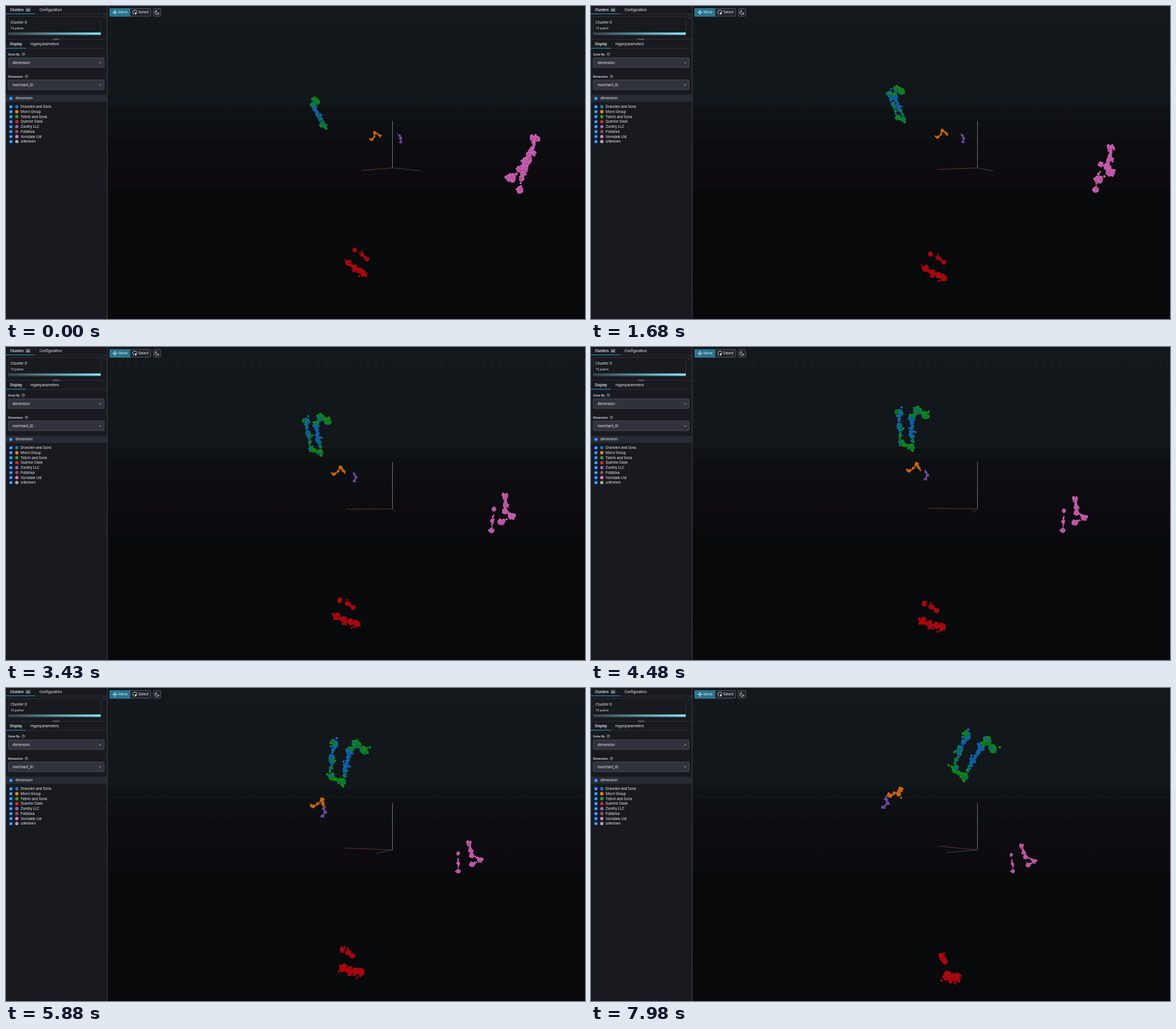
These frames come from a looping animation (1018 px wide and 550 px high, 8000 ms). An HTML page with a canvas:

```html
<!DOCTYPE html>
<html lang="en">
<head>
<meta charset="utf-8">
<title>Cluster view</title>
<style>
  html, body { margin: 0; width: 1018px; height: 550px; overflow: hidden; background: #07090b; }
  canvas, svg { position: absolute; left: 0; top: 0; display: block; }
  text { font: 6.5px Roboto, Arial, sans-serif; fill: #e4e6ea; }
  .bold { font-weight: 500; }
</style>
</head>
<body>
<canvas id="scene" width="1018" height="550"></canvas>
<svg width="1018" height="550" fill="none">
  <defs>
    <linearGradient id="bar"><stop stop-color="#38464c"/><stop offset="1" stop-color="#86ecff"/></linearGradient>
    <g id="help" stroke="#cfd2d8" stroke-width=".6">
      <circle r="2.4"/><path d="M-.8-.5a.8.8 0 1 1 1.1.8q-.3.2-.3.5M0 1.2v.3"/>
    </g>
    <path id="chevron" d="M-1.8-.9 0 .9 1.8-.9" stroke="#dfe2e6" stroke-width=".8"/>
    <g id="check">
      <rect x="-2.8" y="-2.8" width="5.6" height="5.6" rx="1" fill="#1679e6"/>
      <path d="M-1.6 0-.4 1.3 1.7-1.3" stroke="#fff" stroke-width=".9"/>
    </g>
  </defs>
  <path d="M0 0h177v550H0z" fill="#181a1f"/>
  <path d="M177 0h2v550h-2z" fill="#2b2e34"/>

  <text class="bold" x="7" y="9">Clusters</text>
  <rect x="34" y="2.8" width="9.6" height="7.8" rx="2" fill="#3a3e47"/>
  <text class="bold" x="35.8" y="8.8" style="font-size:5.2px">62</text>
  <text x="59" y="9">Configuration</text>
  <path d="M0 14h177M0 58.5h177M0 74.5h177" stroke="#2b2e35"/>
  <path d="M0 13.7h51M0 74.2h35" stroke="#2c9cc6"/>
  <rect x="4" y="18.5" width="162.5" height="33" rx="1" stroke="#30333b"/>
  <text x="8" y="30.7" style="font-size:7.3px">Cluster 0</text>
  <text x="8" y="41.2" style="font-size:5.5px">73 points</text>
  <path d="M4 46.5h162.5v4H4z" fill="url(#bar)"/>
  <rect x="170.5" y="15" width="5.5" height="6.5" rx="2.5" stroke="#3b3e46" stroke-width=".8"/>
  <rect x="82" y="57" width="12" height="3" rx="1" fill="#4a4d55"/>
  <text class="bold" x="7" y="69.3">Display</text>
  <text x="43" y="69.3">Hyperparameters</text>

  <text class="bold" x="3.5" y="86.8" style="font-size:5.5px">Color By</text>
  <use href="#help" x="30.5" y="84.7"/>
  <text class="bold" x="3.5" y="125.8" style="font-size:5.5px">Dimension</text>
  <use href="#help" x="36" y="123.8"/>
  <g fill="#30333c" stroke="#505560" stroke-width=".8">
    <rect x="3.9" y="91" width="168.7" height="17" rx="1.5"/>
    <rect x="3.9" y="130" width="168.7" height="17" rx="1.5"/>
  </g>
  <text x="11.5" y="101.9">dimension</text>
  <text x="11.5" y="140.8">merchant_ID</text>
  <use href="#chevron" x="165.5" y="99.7"/>
  <use href="#chevron" x="165.5" y="138.7"/>

  <path d="M0 156h177v12.5H0z" fill="#272b33"/>
  <use href="#check" x="8.6" y="162.4"/>
  <text x="16.5" y="164.4">dimension</text>
  <g id="legend"></g>

  <rect x="182.5" y="4.5" width="72" height="13.5" rx="1.5" fill="#202329" stroke="#555962"/>
  <path d="M182.5 4.5h35.5v13.5h-35.5z" fill="#26728f" stroke="#3b89a5" stroke-width=".7"/>
  <rect x="259" y="4.5" width="13" height="13.5" rx="1.5" fill="#202329" stroke="#555962"/>
  <g stroke="#fff" stroke-width=".8">
    <path d="M188 11.2h7M191.5 7.7v7M189 10l-1.3 1.2 1.3 1.2M194 10l1.3 1.2-1.3 1.2M190.3 8.7l1.2-1.3 1.2 1.3M190.3 13.7l1.2 1.3 1.2-1.3"/>
    <path d="M224.5 12.3c-4-1.5-1-5 2.5-5s5 3.5 1 4.5M223.5 12.5q1.5.8.5 2.8"/>
    <path d="M264.4 7.7a3.7 3.7 0 1 0 4.6 5a4 4 0 0 1-4.6-5z"/>
  </g>
  <path d="M226.5 10.5l4 3.3-2 .2-1 1.8z" fill="#fff"/>
  <text x="197.7" y="13.4">Move</text>
  <text x="232.8" y="13.4">Select</text>
</svg>
<script>
const legend = [
  ['Dravolen and Sons', '#1f77b4'], ['Morvi Group', '#ff7f0e'], ['Tebrin and Sons', '#2ca02c'],
  ['Quenlor Dask', '#d62728'], ['Zundry LLC', '#9467bd'], ['Fobblixa', '#8c564b'],
  ['Vorndale Ltd', '#e377c2'], ['unknown', '#a8a8a8']
];
document.getElementById('legend').innerHTML = legend.map(([name, color], i) => {
  const y = 177 + i * 8.74;
  return `<use href="#check" x="8.6" y="${y}"/><circle cx="19" cy="${y}" r="2.9" fill="${color}"/>
    <text x="25.8" y="${y + 2.2}">${name}</text>`;
}).join('');

const CX = 679.5, CY = 284.5, UNIT = 84, DIST = 4.7, TILT = 0.09;
const LOOP = 8000, STEP = 70, QUARTER = 7980;

const BLUE = ['#0d5796', '#1669ab'], GREEN = ['#0d7413', '#168f1b'], ORANGE = ['#b85a0a', '#dc7318'],
  RED = ['#9d060d', '#b40c13'], PURPLE = ['#623d90', '#7c52ab'], PINK = ['#ad4b96', '#d069b6'];

let seed = 7;
const random = () => (seed = seed * 16807 % 2147483647) / 2147483647;
const mix = (a, b, t) => a + (b - a) * t;

// Space position from the screen x at the start and the screen x, y a quarter turn later
function locate([x0, x1, y1]) {
  const a = (x0 - CX) / UNIT, b = (x1 - CX) / UNIT, c = (CY - y1) / UNIT;
  let k0 = 1, k1 = 1, x, y, z;
  for (let i = 0; i < 30; i++) {
    x = a * k0;
    z = -b * k1;
    y = c * k1 + TILT * x;
    k0 = 1 + (z + TILT * y) / DIST;
    k1 = 1 + (x + TILT * y) / DIST;
  }
  return { x, y, z };
}

// Scatters dots along a strand: dense and wide at its key points, thin between them
function strand(pick, spread, perPoint, keys) {
  const points = keys.map(locate), last = points.length - 1;
  return Array.from({ length: perPoint * points.length }, () => {
    const at = Math.min(last, Math.max(0, random() * (last + 1) - .5));
    const i = Math.min(last - 1, Math.floor(at)), f = at - i;
    const t = f < .5 ? 4 * f ** 3 : 1 - 4 * (1 - f) ** 3;
    const stray = random() < .05 ? 2 : 1;
    const reach = spread / UNIT * Math.cbrt(random()) * stray * mix(.3, 1, (2 * t - 1) ** 2);
    const up = random() * 2 - 1, turn = random() * Math.PI * 2, flat = reach * Math.sqrt(1 - up * up);
    const p = points[i], q = points[i + 1];
    const dot = {
      x: mix(p.x, q.x, t) + flat * Math.cos(turn),
      y: mix(p.y, q.y, t) + reach * up,
      z: mix(p.z, q.z, t) + flat * Math.sin(turn)
    };
    return { ...dot, color: pick(dot) };
  });
}

// The mixed ring is blue inside and turns green outwards
const heart = locate([547, 672, 115]);
const ringColor = ({ y, z }) =>
  Math.hypot(y - heart.y, z - heart.z) > .08 + .27 * random() ? GREEN : BLUE;

const dots = [
  strand(ringColor, 5, 42, [[539, 660, 83], [548, 647, 110], [556, 638, 142], [562, 655, 157],
    [552, 671, 131], [541, 686, 103], [543, 696, 93], [547, 706, 108]]),
  strand(() => ORANGE, 3.5, 18, [[643, 525, 189], [648, 533, 185], [648, 545, 178], [657, 541, 187]]),
  strand(() => RED, 3.5, 28, [[613, 615, 472], [626, 619, 476], [635, 622, 481]]),
  strand(() => RED, 5.5, 58, [[602, 626, 506], [613, 630, 510], [622, 636, 508], [629, 644, 508]]),
  strand(() => PURPLE, 3, 20, [[692, 519, 195], [695, 522, 203], [694, 514, 210]]),
  strand(() => PINK, 4, 26, [[919, 739, 293], [909, 741, 309], [903, 742, 322]]),
  strand(() => PINK, 5.5, 50, [[930, 757, 277], [923, 761, 290], [914, 764, 297], [908, 780, 304], [887, 769, 311]])
].flat();

const ctx = document.getElementById('scene').getContext('2d');
const sky = ctx.createLinearGradient(0, 0, 0, 550);
[[0, '#13181d'], [.32, '#11161a'], [.325, '#0e1215'], [.34, '#0e1215'], [.345, '#101417'],
 [.37, '#0d1013'], [.48, '#0d0c10'], [.585, '#0d0a0f'], [.587, '#090a0c'], [1, '#07090a']]
  .forEach(([at, color]) => sky.addColorStop(at, color));

function project({ x, y, z }, angle) {
  const cos = Math.cos(angle), sin = Math.sin(angle);
  const rx = x * cos - z * sin, rz = z * cos + x * sin;
  const depth = 1 + (rz + TILT * y) / DIST;
  return { sx: CX + UNIT * rx / depth, sy: CY - UNIT * (y - TILT * rz) / depth, depth };
}

const START = 42.5 * Math.PI / 180;
const axes = [
  [{ x: 0, y: 1, z: 0 }, '#7d8989'],
  [{ x: -Math.cos(START), y: 0, z: Math.sin(START) }, '#7a3d2c'],
  [{ x: Math.sin(START), y: 0, z: Math.cos(START) }, '#2a587a']
];

function disc(x, y, r, color) {
  ctx.fillStyle = color;
  ctx.beginPath();
  ctx.arc(x, y, r, 0, Math.PI * 2);
  ctx.fill();
}

function draw(now) {
  const time = Math.floor(now % LOOP / STEP) * STEP;
  const angle = time / QUARTER * Math.PI / 2;
  ctx.fillStyle = sky;
  ctx.fillRect(179, 0, 839, 550);
  ctx.lineWidth = 0.9;
  for (const [end, color] of axes) {
    const { sx, sy } = project(end, angle);
    ctx.strokeStyle = color;
    ctx.beginPath();
    ctx.moveTo(CX, CY);
    ctx.lineTo(sx, sy);
    ctx.stroke();
  }
  dots.map(dot => ({ color: dot.color, ...project(dot, angle) }))
    .sort((p, q) => q.depth - p.depth)
    .forEach(({ sx, sy, depth, color: [base, light] }) => {
      const r = 1.65 / depth;
      disc(sx, sy, r, base);
      disc(sx - r * .1, sy - r * .2, r * .68, light);
    });
  requestAnimationFrame(draw);
}
requestAnimationFrame(draw);
</script>
</body>
</html>
```
